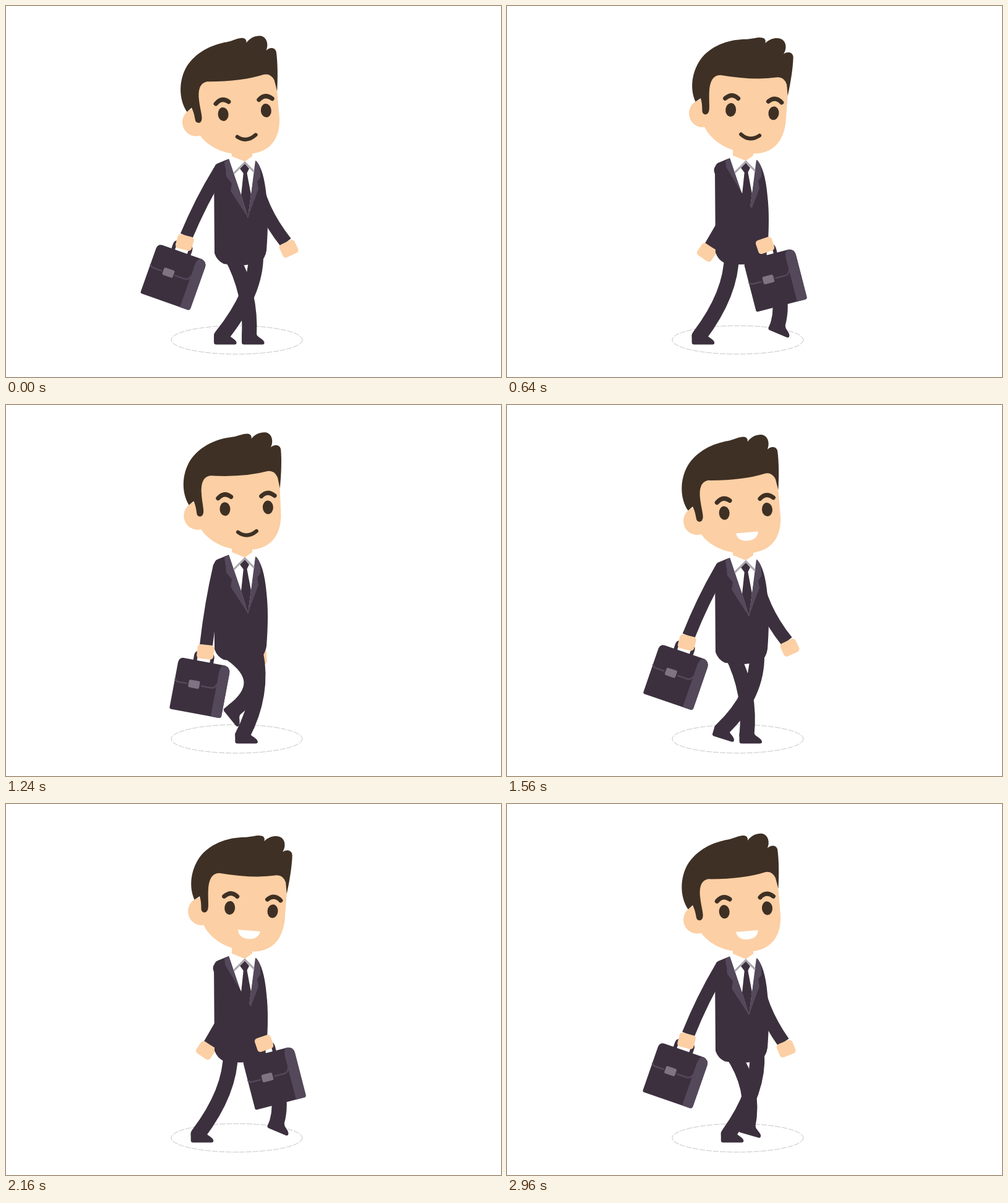
An HTML page with a canvas for the animation above (3000 ms loop, 800 by 600 pixels).

```html
<!DOCTYPE html>
<html lang="en">
<head>
<meta charset="utf-8">
<title>Walking businessman</title>
<style>
  html, body { margin: 0; width: 100%; height: 100%; overflow: hidden; background: #fff; }
  canvas { display: block; }
</style>
</head>
<body>
<canvas id="stage" width="800" height="600"></canvas>
<script>
const ctx = document.getElementById('stage').getContext('2d');
const LOOP = 3000, STEP = 40, CYCLE = 1520;
const SUIT = '#3c303e', LAPEL = '#54485b', HAIR = '#3e3024', SKIN = '#fccfa4', WHITE = '#fff';
const rad = deg => deg * Math.PI / 180;

// Poses of one leg: phase, heel x, heel y, foot angle, knee x, knee y
const GAIT = [
  [0, 381, 548, 0, 397, 464],
  [160, 359, 548, 0, 388, 470],
  [360, 333, 548, 0, 375, 469],
  [760, 284, 548, 0, 358, 463],
  [840, 274, 522, 35, 360, 475],
  [920, 285, 496, 60, 368, 482],
  [960, 288, 493, 61, 373, 481],
  [1080, 328, 481, 70, 428, 446],
  [1240, 350, 493, 51, 427, 447],
  [1440, 374, 531, 16, 402, 459],
  [1520, 381, 548, 0, 397, 464]
];

function pose(phase) {
  const i = GAIT.findIndex(row => row[0] > phase);
  const a = GAIT[i - 1], b = GAIT[i];
  const u = (phase - a[0]) / (b[0] - a[0]);
  return a.map((v, k) => v + (b[k] - v) * u);
}

function fill(path, color) {
  ctx.fillStyle = color;
  ctx.fill(new Path2D(path));
}

function stroke(path, color, width, cap = 'round') {
  ctx.strokeStyle = color;
  ctx.lineWidth = width;
  ctx.lineCap = cap;
  ctx.stroke(new Path2D(path));
}

function ellipse(x, y, rx, ry, color) {
  ctx.fillStyle = color;
  ctx.beginPath();
  ctx.ellipse(x, y, rx, ry, 0, 0, 7);
  ctx.fill();
}

function box(x, y, w, h, r, color) {
  ctx.fillStyle = color;
  ctx.beginPath();
  ctx.roundRect(x, y, w, h, r);
  ctx.fill();
}

function at(x, y, deg, draw) {
  ctx.save();
  ctx.translate(x, y);
  ctx.rotate(rad(deg));
  draw();
  ctx.restore();
}

function shadow() {
  ctx.strokeStyle = '#8a8a8a';
  ctx.lineWidth = 0.5;
  ctx.lineCap = 'butt';
  ctx.setLineDash([9, 2]);
  ctx.beginPath();
  ctx.ellipse(373, 540, 106, 23, 0, 0, 7);
  ctx.stroke();
  ctx.setLineDash([]);
}

function leg(phase, hipX, footShift, kneeShift) {
  const [, hx, hy, deg, kx, ky] = pose(phase % CYCLE);
  const c = Math.cos(rad(deg)), s = Math.sin(rad(deg)), x = hx + footShift;
  const ax = x + 12 * c + 14 * s, ay = hy + 12 * s - 14 * c;
  stroke(`M${hipX} 402Q${kx + kneeShift} ${ky} ${ax} ${ay}`, SUIT, 24);
  at(x, hy, deg, () =>
    fill('M0 -17Q12 -24 24 -17Q25 -14 30 -11Q36 -7 36.5 -4Q37 -0.5 33 -0.5H4Q0 -0.5 0 -4Z', SUIT));
}

// Curved sleeve from the shoulder to the hand, bent by the given offset
function sleeve(sx, sy, hand, deg, bendX, bendY) {
  const wx = hand.x + 11 * Math.sin(rad(deg)), wy = hand.y - 11 * Math.cos(rad(deg));
  const mx = (sx + wx) / 2 + bendX, my = (sy + wy) / 2 + bendY;
  ellipse(sx, sy, 10.5, 10.5, SUIT);
  stroke(`M${sx} ${sy}Q${mx} ${my} ${wx} ${wy}`, SUIT, 21, 'butt');
  at(hand.x, hand.y, deg, () => box(-13.5, -11.5, 27, 23, 5, SKIN));
}

function body() {
  fill('M358 245L341 252Q336 255 336 263L337 397Q341 409 352 414Q386 420 410 411Q419 406 421 392Q425 340 421 306Q417 260 403 246Z', SUIT);
  fill('M360 244L366 234L386 246L402 236L404 247L391 339Z', WHITE);
  fill('M384 265L380 303L391 339L396 302L389 265Z', SUIT);
  fill('M378 260L386 252L393 260L389 268H384Z', SUIT);
  fill('M353 249L360 244L380.500 304L391 339L363 296L365 284L356 273Z', LAPEL);
  fill('M403 247Q409 251 411 262L411.500 274L406 281L408 293L391 339L396 302Z', LAPEL);
  stroke('M368 268L386 250L401 265', '#aaa7ad', 3, 'butt');
  fill('M365 222H398V240L386 248.500L365 240Z', SKIN);
}

function head(grin) {
  ellipse(311, 175, 22, 22.5, SKIN);
  fill('M315 105H442L446 130V180C444 216 424 233 394 233.500C352 235 318 212 311 185Z', SKIN);
  fill('M298 157C286 135 289 106 303 85C320 62 347 52 372 50C385 48 392 44 399 46' +
    'C403 47 404 51 403 54C410 46 420 43 428 45C437 48 439 60 434 69C440 64 449 65 450 73' +
    'C451 90 449 115 446 136L443 118Q438 106 427 107.500Q390 116 335 111' +
    'C322 112 319 124 319 138C319 150 322 165 321 170Q320 176 315.500 176.500Q310 176 310 170Q309 158 306 151Z', HAIR);
  for (const x of [356, 425.5]) ellipse(x, 165.8, 8.5, 11, HAIR);
  stroke('M345.500 148Q356 137.500 366.500 146.500M415.500 147.500Q426 137.500 437 147.500', HAIR, 7);
  if (grin) fill('M372 200H408Q406 213.500 390 213.500Q374 213.500 372 200Z', WHITE);
  else stroke('M375.500 204Q390 215.500 405.500 203.500', HAIR, 6);
}

function bag() {
  stroke('M-14 18V9Q-14 3 -8 3H7Q13 3 13 9V18', SUIT, 6, 'butt');
  ctx.translate(1.5, 0);
  fill('M-42 98V24Q-41 16 -34 16H34Q43 18 43 27V97Q43 101 39 101H-39Q-42 101 -42 98Z', SUIT);
  fill('M26 101V30Q26 18 32 16Q43 18 43 27V97Q43 101 39 101Z', LAPEL);
  stroke('M-41.500 51Q-41 55 -36 55.500H18Q25 55 26 48', LAPEL, 2.5, 'butt');
  box(-21, 48, 22, 14, 3, SUIT);
  box(-19, 48.5, 18, 12.5, 2.5, '#7e7483');
}

function draw(time) {
  const phase = time % CYCLE, turn = 2 * Math.PI * phase / CYCLE;
  const c = Math.cos(turn), s = Math.sin(turn), bob = 3 * Math.cos(2 * turn);
  const bagDeg = 1.9 + 17.6 * c - 1.8 * s;

  const far = { x: 384 + 73 * c + 6 * s };
  far.y = 411 + bob - (far.x > 395 ? 0.0056 : 0.0027) * (far.x - 395) ** 2;
  const near = { x: 362.5 - 3.78 * bagDeg };
  near.y = 407.5 + bob - (near.x < 352 ? 0.007 : 0.0052) * (near.x - 352) ** 2;

  ctx.fillStyle = WHITE;
  ctx.fillRect(0, 0, 800, 600);
  shadow();
  sleeve(402, 268 + bob, far, 0.44 * (457 - far.x) - 25, -0.12 * (far.x - 300), 0);
  leg(phase, 363, 0, 0);
  leg(phase + CYCLE / 2, 404, 52, 47);
  at(0, bob, 0, body);
  at(391, 234 + bob, 0.35 * s - 4.9 * c, () => {
    ctx.translate(-390.5, -231);
    head(time >= CYCLE);
  });
  at(near.x, near.y, bagDeg, bag);
  sleeve(345, 264 + bob, near, bagDeg - 4.5, -3, -4);
}

function tick() {
  const time = performance.now() % LOOP;
  draw(Math.floor(time / STEP) * STEP);
  requestAnimationFrame(tick);
}
tick();
</script>
</body>
</html>
```
